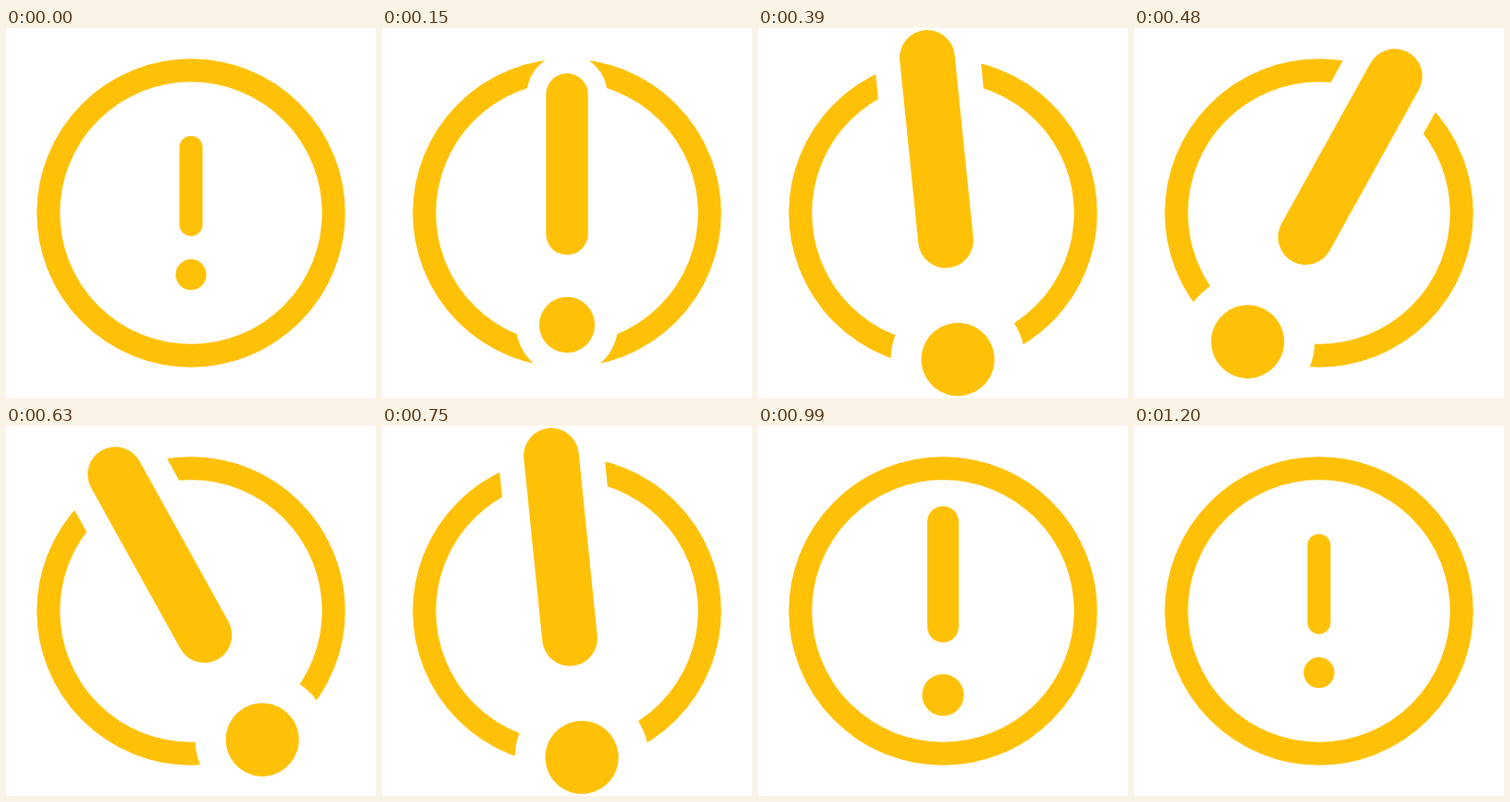
An HTML page for the animation above (1230 ms loop, 400 by 400 pixels).

```html
<!DOCTYPE html>
<html lang="en">
<head>
<meta charset="utf-8">
<title>Alert</title>
<style>
  html, body { margin: 0; height: 100%; overflow: hidden; background: #fff; }
  svg { display: block; width: 100vw; height: 100vh; }
  .bar { fill: none; stroke: #ffc107; stroke-linecap: round; stroke-width: 25; }
  .dot { fill: #ffc107; }
  .gap .bar { stroke: #fff; stroke-width: 48; }
  .gap .dot { fill: #fff; }
</style>
</head>
<body>
<svg viewBox="-200 -200 400 400">
  <circle class="bar" r="154.2"/>
  <g id="mark">
    <g class="gap">
      <path class="bar" d="M0-70.8V12.5"/>
      <circle class="dot" cy="66.7" r="30.4"/>
    </g>
    <path class="bar" d="M0-70.8V12.5"/>
    <circle class="dot" cy="66.7" r="16.6"/>
  </g>
</svg>
<script>
  const LOOP = 1230, TICK = 30, GROWTH = 1.385;
  const mark = document.getElementById('mark');
  // [tick, degrees]
  const swing = [[0, 0], [9, 0], [11, -29], [16, 29], [21, -29], [26, 0], [41, 0]];

  function angleAt(tick) {
    const i = swing.findIndex(([end]) => tick < end);
    const [t0, a0] = swing[i - 1], [t1, a1] = swing[i];
    return a0 + (a1 - a0) * (tick - t0) / (t1 - t0);
  }

  function scaleAt(tick) {
    if (tick < 9) return 1 + GROWTH * (1 - Math.cos(Math.PI * tick / 9)) / 2;
    if (tick < 26) return 1 + GROWTH;
    return 1 + GROWTH * Math.pow((40 - tick) / 14, 1.94);
  }

  function draw() {
    const tick = Math.floor(performance.now() % LOOP / TICK);
    mark.setAttribute('transform', `rotate(${angleAt(tick)}) scale(${scaleAt(tick)})`);
    requestAnimationFrame(draw);
  }
  draw();
</script>
</body>
</html>
```
